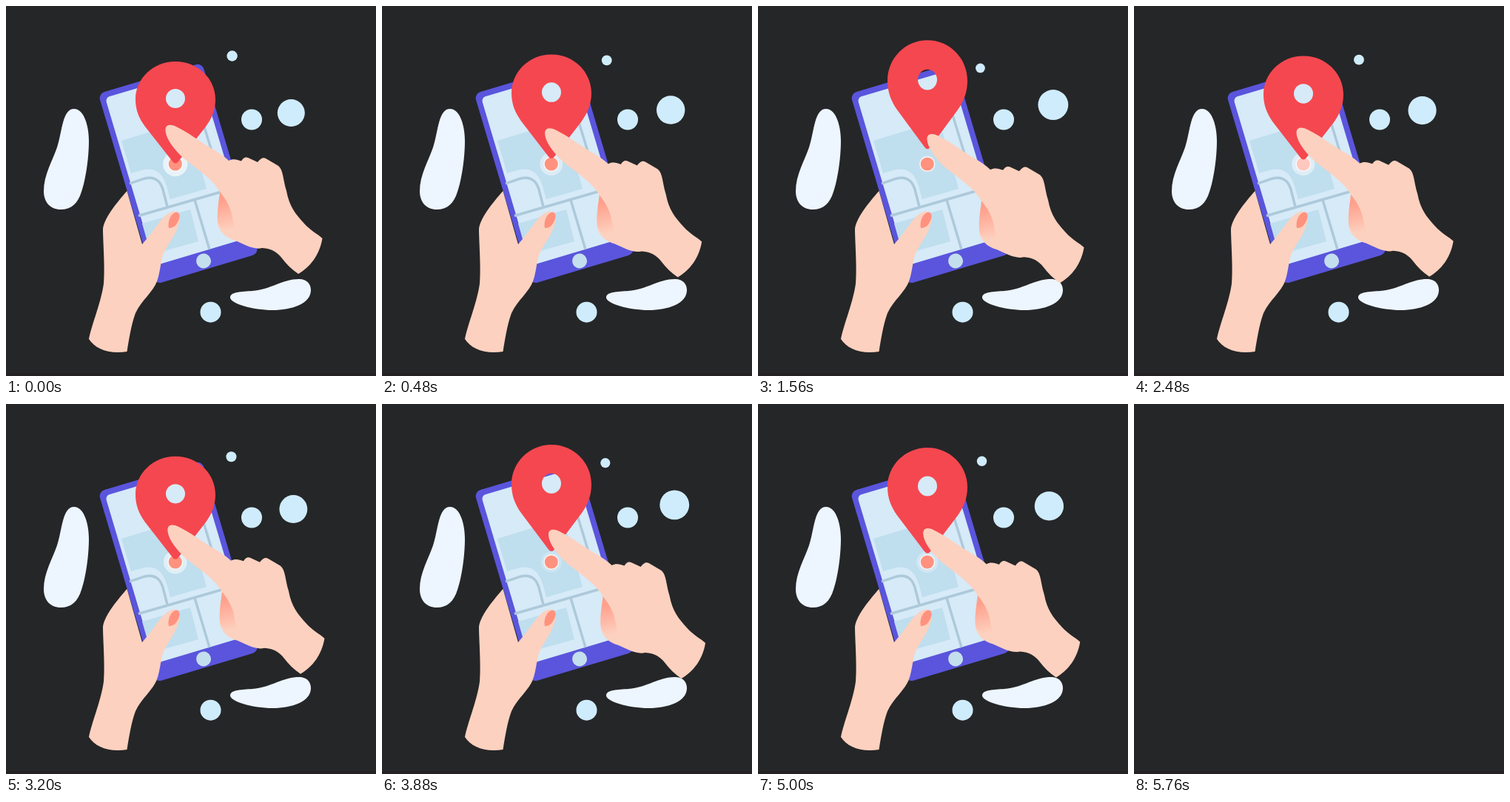
Write an HTML page that moves like this. It is 500x500 px and loops after 5.8 s.

```html
<!DOCTYPE html>
<html lang="en">
<head>
<meta charset="utf-8">
<title>Map pin on a phone</title>
<style>
  html, body { margin: 0; width: 100%; height: 100%; overflow: hidden; background: #252628; }
  svg { display: block; width: 100%; height: 100%; }
  .bubble { fill: #cfecfd; }
  .blob { fill: #edf5fe; }
  .skin { fill: #fdd1bf; }
  .block { fill: #bfdeee; }
  .road { fill: none; stroke: #adc9da; stroke-width: 3.4; }
</style>
</head>
<body>
<svg viewBox="0 0 500 500">
  <defs>
    <linearGradient id="shade" gradientUnits="userSpaceOnUse" x1="291" y1="262" x2="301" y2="303">
      <stop offset="0" stop-color="#ff9f8b"/>
      <stop offset="1" stop-color="#fdd1bf"/>
    </linearGradient>
  </defs>
  <rect width="500" height="500" fill="#252628"/>
  <rect y="496" width="500" height="4" fill="#242223"/>

  <g id="scene">
    <path class="blob" d="M92 139C105 139 112 161 112 182C112 208 107 237 102 251C97 267 88 275 74 275C60 275 51 265 51 250C51 228 63 209 69 191C76 170 76 139 92 139Z"/>
    <path class="blob" d="M303 394C303 386 319 386 333 385C358 383 374 369 396 369C407 369 412 376 412 384C412 402 387 411 360 411C334 411 303 402 303 394Z"/>
    <circle class="bubble" cx="332" cy="153.5" r="14"/>
    <circle class="bubble" cx="276.5" cy="413.7" r="14"/>
    <circle class="bubble" id="small"/>
    <circle class="bubble" id="big"/>

    <g transform="translate(124.5 118.5) rotate(-16.6)">
      <rect width="146.5" height="269" rx="9" fill="#5a55dc"/>
      <rect x="7.5" y="8" width="131.5" height="236.5" rx="6" fill="#d6eaf8"/>
      <circle cx="72" cy="257.3" r="10" fill="#c3dfee"/>
    </g>
    <path class="block" d="M156 182L245 155L271 247L222 261L217 243Q209 217 187 221L169 226Z"/>
    <path class="block" d="M184 294L249 275L260 318L196 336Z"/>
    <path class="road" d="M179 283.5L300 248.5M255 262L275 329M167 240L186 233.500Q206 228 212 248L218 271M248 98L284 216"/>

    <path class="skin" d="M163.500 250C153 262 133 285 131 301C131 318 134 354 132 375C129 399 116 430 112 450C120 463 139 471 163.500 467C166 452 169 431 175 415C183 398 199 386 204 372C209 359 209 341 214 332C220 320 234 303 234.500 288C235 280 230 276 224 278C209 284 203 301 184 322Z"/>
    <path fill="#ff927e" d="M220 300C218 289 224 279 231 278.500C236 280 235 287 232 292C229 298 225 300 220 300Z"/>

    <circle id="ring" cx="228.800" cy="213.500" fill="#fff"/>
    <circle cx="228.800" cy="213.500" r="9.800" fill="#ff927e" stroke="#f6f8fb" stroke-width="1.500"/>
    <circle id="glow" cx="228.800" cy="213.500" r="9.800" fill="#fff"/>

    <path id="pin" fill="#f5474f" fill-rule="evenodd" d="M229 75C259 75 283 98 283 126C283 141 278 152 270 163L233 210Q229 215 225 210L188 163C180 152 175 141 175 126C175 98 199 75 229 75ZM229 112A13 13 0 1 0 229 138A13 13 0 1 0 229 112Z"/>

    <g id="hand">
      <path class="skin" d="M215.500 168C215 160 222 159 230 163C245 170 262 183 275 191C286 197 295 203 301 209C306 206 312 207 318 209.500Q322 203 327 205L340 211Q346 203 351 206L368 216C375 222 374 234 379 250C383 271 391 281 403 294C411 303 421 308 427.500 314C424 336 411 353 395 362C386 356 379 349 373 341C366 332 359 328 346 327C335 330 322 322 310 317C298 314 286 304 286 291C285 275 288 262 289 251C280 235 262 223 248 212C234 202 216 182 215.500 168Z"/>
      <path fill="url(#shade)" d="M289 251C297 261 304 272 306 286Q308 298 313 308C302 307 286 301 286 290C285 276 288 262 289 251Z"/>
    </g>
  </g>
</svg>
<script>
  const LOOP = 5800, HALF = 1450, BLANK = 5760;
  const $ = id => document.getElementById(id);
  const mix = (a, b, p) => a + (b - a) * p;

  // [time, value]
  const lift = [[0, 0], [70, 0], [1410, 1], [1455, 1], [2800, 0], [3020, 0], [4350, .985], [5700, 0], [LOOP, 0]];
  const flash = [[0, 0], [2200, 0], [2480, .5], [2800, 0], [2900, 0]];

  function sample(keys, t) {
    const i = Math.max(1, keys.findIndex(k => k[0] > t));
    const [t0, v0] = keys[i - 1], [t1, v1] = keys[i];
    return mix(v0, v1, (t - t0) / (t1 - t0));
  }

  function setCircle(id, attrs) {
    for (const name in attrs) $(id).setAttribute(name, attrs[name]);
  }

  function draw(t) {
    const phase = t % (2 * HALF);
    const p = 1 - Math.abs(phase / HALF - 1);
    const up = sample(lift, t);

    $("scene").style.display = t < BLANK ? "" : "none";
    $("hand").setAttribute("transform", `translate(${14.1 * p} ${13.4 * p})`);

    // The pin stretches a little as it rises.
    const stretch = mix(1, 1.075, up);
    $("pin").setAttribute("transform", `translate(0 ${75 - 31.3 * up}) scale(1 ${stretch}) translate(0 -75)`);

    setCircle("small", { cx: mix(305.6, 300, p), cy: mix(67.5, 85.3, p), r: mix(7.2, 6.3, p) });
    setCircle("big", { cx: mix(385.3, 400, p), cy: mix(144.5, 132.6, p), r: mix(18.5, 20.6, p) });
    setCircle("ring", { r: mix(16.7, 13, p), opacity: .65 * (1 - p) });
    setCircle("glow", { opacity: sample(flash, phase) });
  }

  const start = performance.now();
  function tick() {
    draw((performance.now() - start) % LOOP);
    requestAnimationFrame(tick);
  }
  tick();
</script>
</body>
</html>
```
